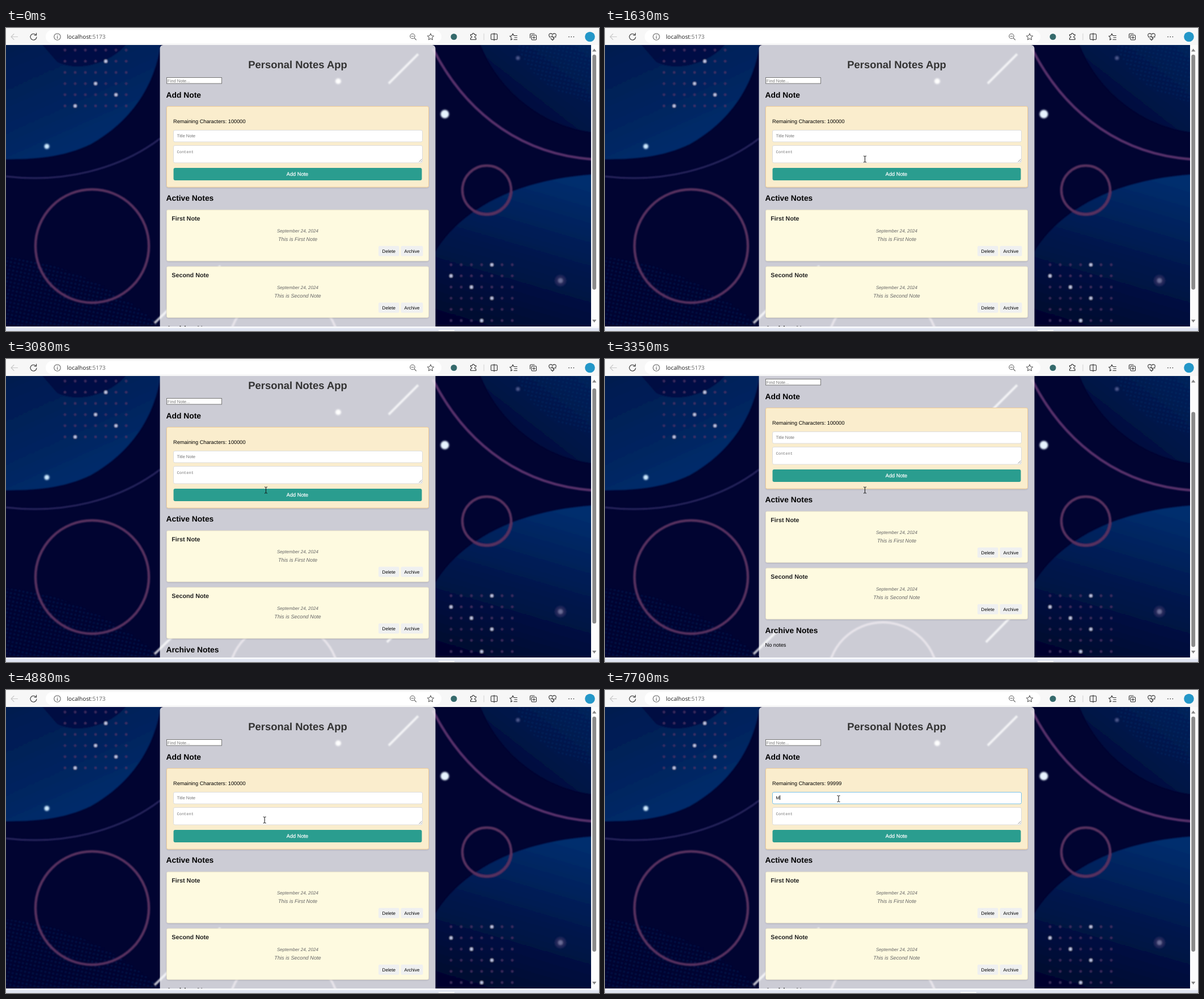
These frames come from a looping animation (1046 by 535 pixels, 8000 ms). An HTML page:

```html
<!DOCTYPE html>
<html lang="en">
<head>
<meta charset="utf-8">
<title>Notes</title>
<style>
html, body { margin: 0; width: 100%; height: 100%; overflow: hidden; background: #f7f7f7; }
svg { display: block; }
text { font: 9.22px "Liberation Sans", Arial, sans-serif; text-rendering: geometricPrecision; }
.h1 { font-size: 18.44px; font-weight: bold; fill: #333; }
.h2 { font-size: 13.83px; font-weight: bold; }
.h3 { font-size: 10.78px; font-weight: bold; fill: #222; }
.mid { text-anchor: middle; }
.it { font-style: italic; fill: #666; }
.date { font-size: 8.07px; }
.small { font-size: 8.07px; text-anchor: middle; }
.field { font-size: 7.68px; fill: #757575; }
.mono { font: 7px "Liberation Mono", monospace; fill: #757575; }
.url { font: 10.1px "Open Sans", "Noto Sans", sans-serif; fill: #1b1b1b; }
.icon { fill: none; stroke: #333; stroke-width: 1.1; stroke-linecap: round; stroke-linejoin: round; }
</style>
</head>
<body>
<svg width="1046" height="535" viewBox="0 0 1046 535">
  <defs>
    <clipPath id="view"><path d="M0 30H1032V527H0z"/></clipPath>
    <filter id="soft"><feGaussianBlur stdDeviation=".8"/></filter>
    <filter id="glow" x="-100%" y="-100%" width="300%" height="300%"><feGaussianBlur stdDeviation="1.6"/></filter>
    <filter id="drop" x="-5%" y="-5%" width="110%" height="115%"><feDropShadow dx="0" dy="1" stdDeviation="1" flood-opacity=".16"/></filter>
    <linearGradient id="blueL" x1="0" y1="0" x2=".6" y2="1">
      <stop offset="0" stop-color="#011a4e"/><stop offset=".6" stop-color="#022560"/><stop offset="1" stop-color="#013070"/>
    </linearGradient>
    <linearGradient id="blueR" x1=".7" y1="0" x2=".4" y2="1">
      <stop offset="0" stop-color="#022e6e"/><stop offset=".5" stop-color="#01184d"/><stop offset="1" stop-color="#01062f"/>
    </linearGradient>
    <linearGradient id="blueT" x1="1" y1="0" x2=".2" y2=".8">
      <stop offset="0" stop-color="#02235c"/><stop offset="1" stop-color="#010a38"/>
    </linearGradient>
    <pattern id="halftone" width="7" height="7" patternUnits="userSpaceOnUse" patternTransform="rotate(12)">
      <circle cx="3.5" cy="3.5" r="1.7" fill="#033070"/>
    </pattern>
  </defs>

  <g clip-path="url(#view)">
    <path fill="#010431" d="M0 30H1032V527H0z"/>
    <g filter="url(#soft)">
      <path fill="url(#blueL)" d="M-5 25H274C262 105 220 165 150 205C100 229 50 232 -5 232z"/>
      <path fill="#010b3c" d="M60 25H215C190 60 130 80 90 60z" opacity=".7"/>
      <path fill="url(#blueT)" d="M835 25H1040V185C950 175 870 115 835 25z"/>
      <path fill="url(#blueR)" d="M757 395C800 325 890 268 1040 258V535H757z"/>
      <path fill="url(#halftone)" opacity=".45" d="M0 405C80 410 190 450 272 527H0zM900 30H1032V130C970 120 920 85 900 30z"/>
      <g fill="none" stroke="#58305f">
        <path stroke="#29285f" stroke-width="3" d="M0 262C100 274 200 250 272 195"/>
        <path stroke="#59306b" stroke-width="4.5" d="M753 36C800 130 890 222 1036 232"/>
        <circle cx="152" cy="385" r="100" stroke-width="4.5"/>
        <circle cx="848" cy="286" r="43" stroke-width="4.5"/>
        <circle cx="490" cy="562" r="97" stroke="#8a7796" stroke-width="4"/>
      </g>
      <path stroke="#fff" stroke-width="4" d="M675 98L727 46M262 521L302 482M672 500L714 457M345 455L378 420" opacity=".75"/>
      <g id="dots"></g>
    </g>
    <g filter="url(#glow)">
      <circle cx="72" cy="209" r="4.5" fill="#cdeaff"/>
      <circle cx="774" cy="152" r="7.5" fill="#e8f4ff"/>
      <circle cx="586" cy="94" r="5" fill="#fff"/>
      <circle cx="903" cy="53" r="3.5" fill="#4c568a"/>
      <circle cx="978" cy="446" r="10" fill="#24285a"/>
      <circle cx="978" cy="446" r="4" fill="#6c6d98"/>
    </g>

    <g id="page">
      <rect x="271.5" y="30" width="486" height="552.6" rx="6" fill="#fff" fill-opacity=".8"/>
      <text class="h1 mid" x="514.5" y="71">Personal Notes App</text>
      <rect x="283.5" y="87.5" width="97" height="10.5" fill="#fff" stroke="#767676"/>
      <text class="field" x="284.8" y="95.7">Find Note...</text>
      <text class="h2" x="282.5" y="122.7">Add Note</text>
      <rect x="283.5" y="138.5" width="462" height="142.5" rx="2.5" fill="#faedcd" stroke="#f3cf98" filter="url(#drop)"/>
      <text id="count" x="295" y="168"></text>
      <rect id="title" x="295.5" y="180.5" width="439" height="20.5" rx="2.5" fill="#fff"/>
      <text id="entry" class="field" x="301.5" y="193"></text>
      <path id="caret" stroke="#000" stroke-width=".9" d="M0 186V194"/>
      <rect x="295.5" y="207.5" width="439" height="30.5" rx="2.5" fill="#fff" stroke="#ddd"/>
      <text class="mono" x="301.5" y="220.5">Content</text>
      <path stroke="#777" stroke-width=".8" d="M728.5 236.5L733.5 231.5M731.5 236.5L733.5 234.5"/>
      <rect id="add" x="295.5" y="247" width="438" height="22" rx="3"/>
      <text class="mid" x="514" y="260.7" fill="#fff" stroke="#fff" stroke-width=".2">Add Note</text>
      <text class="h2" x="282.5" y="305.3">Active Notes</text>
      <g id="notes"></g>
      <text class="h2" x="282.5" y="536">Archive Notes</text>
      <text x="282.5" y="560">No notes</text>
    </g>
  </g>

  <path fill="#fcfcfc" d="M1032 30H1046V527H1032z"/>
  <path fill="#858585" d="M1034 41.5L1037.7 36.5L1041.4 41.5zM1034 515L1037.7 520L1041.4 515z"/>
  <rect id="thumb" x="1034.3" width="6.8" height="415" rx="3.4" fill="#8b8b8b"/>
  <path fill="#f6f7fa" d="M0 527H1046V530H0z"/>
  <path fill="#dfe4f1" d="M0 530H1046V535H0z"/>
  <rect id="task" y="533" width="28" height="2" fill="#fafbfd"/>

  <path fill="#f7f7f7" d="M0 0H1046V30H0z"/>
  <rect x="70" y="3.5" width="698" height="23.5" rx="11.7" fill="#fff"/>
  <text class="url" x="107.5" y="19">localhost<tspan fill="#666">:5173</tspan></text>
  <g class="icon">
    <path stroke="#c9c9c9" d="M20.5 15.5H9M14 10.5L9 15.5L14 20.5"/>
    <path d="M53 12.5A5.5 5.5 0 1 0 54 16M53.6 9V12.8H49.8"/>
    <g stroke="#666">
      <circle cx="90.5" cy="15.5" r="5.7"/><path d="M90.5 14.5V18.5M90.5 12.3V12.4"/>
      <circle cx="717" cy="14.5" r="4.2"/><path d="M720.2 17.7L723.5 21M715 14.5H719"/>
    </g>
    <path id="star" stroke="#666"/>
    <path d="M819.5 11.5H822.5A1.8 1.8 0 1 1 826 11.5H829V14A1.8 1.8 0 1 0 829 17.5V20.5H819.5V17.5A1.8 1.8 0 1 0 819.5 14z"/>
    <path stroke="#d5d5d5" d="M843 10V21"/>
    <rect x="855.5" y="10.5" width="11" height="10" rx="1.5"/><path d="M861 9V22"/>
    <path d="M893 19.5L890.5 21L891.3 17L888.8 14.3L892.2 13.8L894 10L895.8 13.5H901.5M897 17H901.5M896 20.5H901.5"/>
    <rect x="927" y="12.5" width="8.5" height="8.5" rx="1.5"/><path d="M924.5 17.5V11.5Q924.5 10 926 10H932M931.2 14.5V19M929 16.8H933.5"/>
    <path d="M958.5 15C955.5 10 961.5 8 964 11.5C966.500 8 972.500 10 969.500 15M958.500 16H962L963.500 13.500L965.500 18L966.500 16H970M961 18.500L964 21.500L967 18.500"/>
  </g>
  <path stroke="#333" stroke-width="1.7" stroke-linecap="round" d="M993 15.500H993.010M997.200 15.500H997.210M1001.400 15.500H1001.410"/>
  <circle cx="790" cy="15.500" r="5.500" fill="#356a6c"/>
  <circle cx="1030" cy="15.500" r="8.800" fill="#2497c8"/>

  <path id="arrow" fill="#fff" stroke="#000" stroke-width=".8" d="M0 0V11L2.600 8.600L4.300 12.300L5.900 11.600L4.300 8H7.700z"/>
  <path id="beam" fill="none" stroke="#111" d="M-2.500 -5.500Q0 -5.500 0 -4.500Q0 -5.500 2.500 -5.500M0 -4.500V4.500M-2.500 5.500Q0 5.500 0 4.500Q0 5.500 2.500 5.500"/>
</svg>
<script>
const $ = id => document.getElementById(id);
const set = (id, attrs) => { for (const k in attrs) $(id).setAttribute(k, attrs[k]); };
const move = (id, x, y) => set(id, { transform: `translate(${x} ${y})` });
const show = (id, on) => set(id, { visibility: on ? 'visible' : 'hidden' });

function dotGrid(x, y, dx, dy, bright) {
  let out = '';
  for (let r = 0; r < 6; r++) for (let c = 0; c < 7; c++) {
    const lit = bright.includes(r * 7 + c);
    out += `<circle cx="${x + c * dx}" cy="${y + r * dy}" r="${lit ? 2.6 : 1.9}" fill="${lit ? '#c8cdec' : '#463467'}"/>`;
  }
  return out;
}
$('dots').innerHTML = dotGrid(104, 39, 18, 19.7, [11, 24, 33, 36]) + dotGrid(785, 418, 18, 19.7, [4, 7, 16, 25, 38]);

const smallButton = (x, y, w, label) =>
  `<rect x="${x}" y="${y}" width="${w}" height="18" rx="2.5" fill="#eff0f0"/>
   <text class="small" x="${x + w / 2}" y="${y + 11.7}">${label}</text>`;
const note = (name, y) =>
  `<rect x="283.5" y="${y}" width="462" height="90" rx="2.5" fill="#fefae0" stroke="#efe6c6" stroke-width=".7" filter="url(#drop)"/>
   <text class="h3" x="292.3" y="${y + 18.9}">${name} Note</text>
   <text class="it date mid" x="514.5" y="${y + 39.4}">September 24, 2024</text>
   <text class="it mid" x="514.5" y="${y + 54.8}">This is ${name} Note</text>` +
  smallButton(657, y + 63.6, 36.5, 'Delete') + smallButton(696.5, y + 63.6, 39, 'Archive');
$('notes').innerHTML = note('First', 321.2) + note('Second', 421.2);

const star = [...Array(10).keys()].map(i => {
  const a = i * Math.PI / 5, r = i % 2 ? 2.9 : 6;
  return `${749 + r * Math.sin(a)} ${15.8 - r * Math.cos(a)}`;
});
set('star', { d: `M${star.join('L')}z` });

// [time, content offset, thumb offset]; the thumb runs slightly ahead
const scrolls = [
  [0, 0, 0],
  [1140, 2, 5], [1210, 6, 9], [1270, 10, 14], [1340, 15.5, 22], [1410, 48, 54], [1480, 52, 40], [1630, 0, 0],
  [2750, 4, 15.4], [2810, 30, 42], [2880, 53, 55.6], [2940, 55.6, 55.6], [3010, 43, 31], [3080, 18, 6],
  [3150, 1, 0], [3210, 5, 16], [3280, 32, 43], [3340, 52, 55], [3410, 55.6, 55.6],
  [4270, 55.5, 50], [4340, 40, 27], [4410, 12, 4], [4480, 0, 0]
];

// progress from 0 to 1 in even ticks, the first at start and the last at end
function ticks(t, start, end, n) {
  if (t < start) return 0;
  return Math.min(1, (Math.floor((t - start) / (end - start) * (n - 1) + 1e-6) + 1) / n);
}
const mix = (a, b, p) => a + (b - a) * p;

function pointer(t) {
  if (t < 4880) {
    const p = ticks(t, 190, 940, 12), e = p * p * (3 - 2 * p);
    return [mix(1002, 458.5, e), mix(536, 231.5, e)];
  }
  const e = ticks(t, 4880, 5630, 10) ** 1.3;
  return [mix(458.5, 412, e), mix(231.5, 192, e)];
}

function draw(t) {
  const [, offset, thumb] = scrolls.findLast(k => k[0] <= t);
  move('page', 0, -offset);
  set('thumb', { y: 47 + thumb * 0.845 });

  const [x, y] = pointer(t), text = y < 238;
  move('arrow', x, y);
  move('beam', x, y);
  show('arrow', t >= 190 && !text);
  show('beam', t >= 190 && text);
  const hover = y > 247 && y < 269 && x < 733;
  set('add', { fill: hover ? '#21867a' : '#2a9d8f' });

  const focus = t >= 5830, typed = t >= 7700;
  set('title', { stroke: focus ? '#7cc3ea' : '#ddd' });
  set('task', { x: focus ? 627 : 763 });
  $('count').textContent = 'Remaining Characters: ' + (typed ? 99999 : 100000);
  $('entry').textContent = typed ? 'M' : 'Title Note';
  $('entry').style.fill = typed ? '#000' : '';
  move('caret', typed ? 308.6 : 301.5, 0);
  show('caret', typed || focus && Math.floor((t - 5840) / 530) % 2 === 0);
}

function loop() {
  draw(performance.now() % 8000);
  requestAnimationFrame(loop);
}
loop();
</script>
</body>
</html>
```
